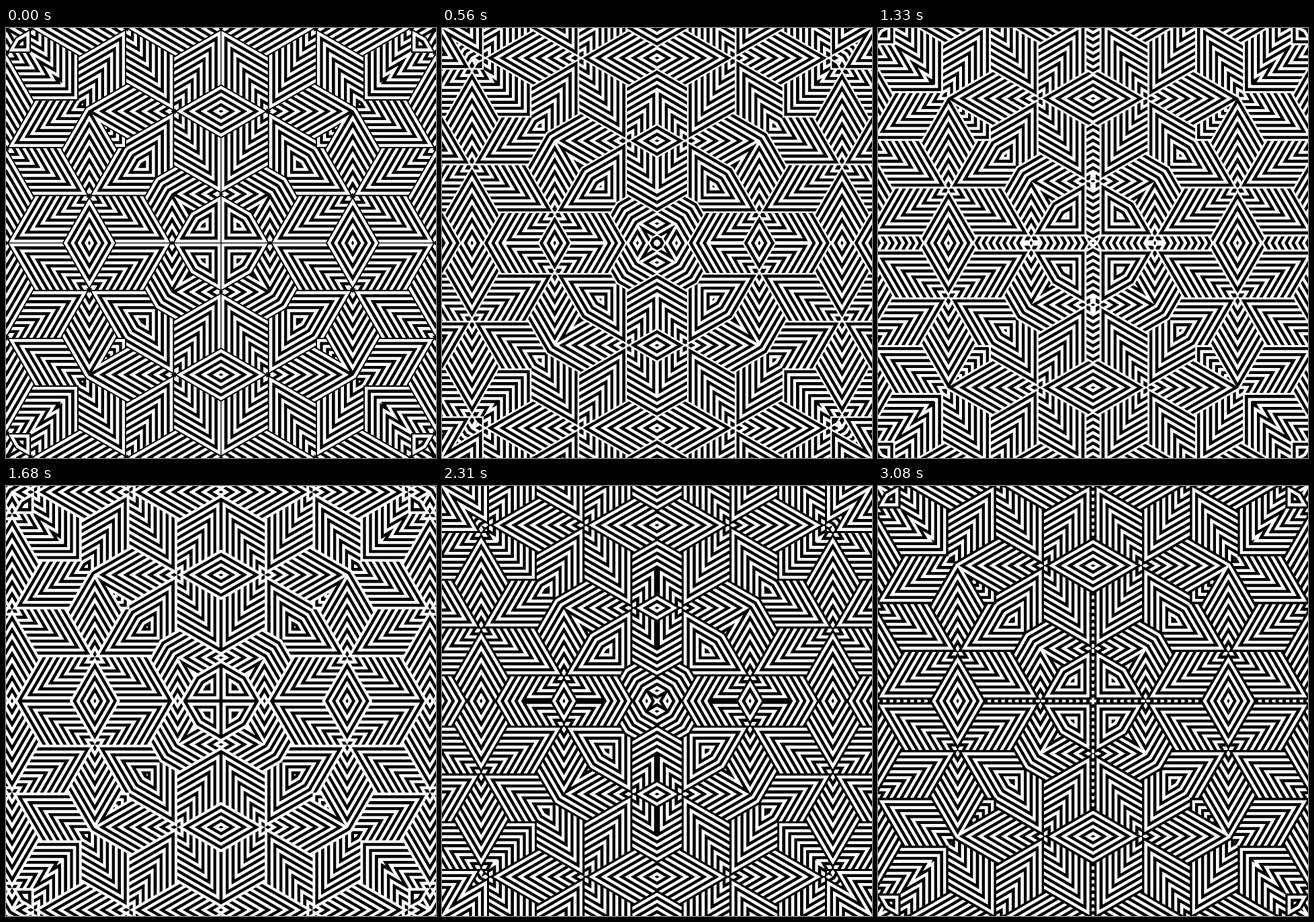
An HTML page with a canvas for the animation above (3150 ms loop, 640 by 640 pixels).

```html
<!DOCTYPE html>
<html lang="en">
<head>
<meta charset="utf-8">
<title>Striped kaleidoscope</title>
<style>
  html, body { margin: 0; width: 100%; height: 100%; overflow: hidden; background: #000; }
  canvas { display: block; width: 100vw; height: 100vh; }
</style>
</head>
<body>
<canvas id="stage" width="640" height="640"></canvas>
<script>
const SIZE = 640, HALF = SIZE / 2;
const STEPS = 45, STEP_MS = 70;
const ROOT3 = Math.sqrt(3);
const WIDTH = SIZE / 9;          // distance between opposite edges of a rhombus
const CELL_W = 2 * WIDTH, CELL_H = 2 * ROOT3 * WIDTH;
const STRIPE = WIDTH / 8;        // one black and one white stripe
const STRIPE_CYCLES = -8;        // stripes flow out over the tip edges
const STRIPE_START = 0.72;       // where white ends at first, in stripe periods
const START = { x: 69.8, y: 196 };
const SAMPLES = 3;

const ctx = document.getElementById('stage').getContext('2d');
const image = ctx.createImageData(SIZE, SIZE);
const pixels = new Uint32Array(image.data.buffer);

const wrap = (value, period) => value - period * Math.round(value / period);

// Depth inside a rhombus, measured from the two edges at its tip.
// Tips point along 0, 120 and 240 degrees on a triangular lattice of stars.
function chevronDepth(x, y) {
  let u = wrap(x, CELL_W), v = wrap(y, CELL_H);
  const u2 = wrap(x - CELL_W / 2, CELL_W), v2 = wrap(y - CELL_H / 2, CELL_H);
  if (u2 * u2 + v2 * v2 < u * u + v * v) { u = u2; v = v2; }

  const a = u, b = (-u + ROOT3 * v) / 2, c = (-u - ROOT3 * v) / 2;
  const absA = Math.abs(a), absB = Math.abs(b), absC = Math.abs(c);
  let along, across;
  if (absA >= absB && absA >= absC) { along = a; across = b - c; }
  else if (absB >= absC) { along = b; across = a - c; }
  else { along = c; across = a - b; }
  const fromTip = along > 0 ? CELL_W - along : -along;
  return (fromTip - Math.abs(across)) / 2;
}

function shade(px, py, star, phase) {
  let white = 0;
  for (let j = 0; j < SAMPLES; j++) {
    for (let i = 0; i < SAMPLES; i++) {
      const x = px + (i + 0.5) / SAMPLES, y = py + (j + 0.5) / SAMPLES;
      const depth = chevronDepth(Math.min(x, y) - star.x, Math.max(x, y) - star.y);
      const turn = depth / STRIPE - phase;
      if (turn - Math.floor(turn) >= 0.5) white++;
    }
  }
  return Math.round(255 * white / (SAMPLES * SAMPLES));
}

function put(x, y, color) {
  const left = HALF - 1 - x, right = HALF + x;
  const top = (HALF - 1 - y) * SIZE, bottom = (HALF + y) * SIZE;
  pixels[top + left] = pixels[top + right] = color;
  pixels[bottom + left] = pixels[bottom + right] = color;
}

function draw(step) {
  const progress = step / STEPS;
  const shift = 2 * WIDTH * progress;
  const star = { x: START.x - shift, y: START.y - shift * ROOT3 };
  const phase = STRIPE_START + STRIPE_CYCLES * progress;
  for (let y = 0; y < HALF; y++) {
    for (let x = 0; x <= y; x++) {
      const gray = shade(x, y, star, phase);
      const color = (0xff000000 | gray * 0x010101) >>> 0;
      put(x, y, color);
      put(y, x, color);
    }
  }
  ctx.putImageData(image, 0, 0);
}

const startTime = performance.now();
let shown = -1;

function tick() {
  const elapsed = performance.now() - startTime;
  const step = Math.floor(elapsed / STEP_MS) % STEPS;
  if (step !== shown) draw(shown = step);
  requestAnimationFrame(tick);
}
tick();
</script>
</body>
</html>
```
